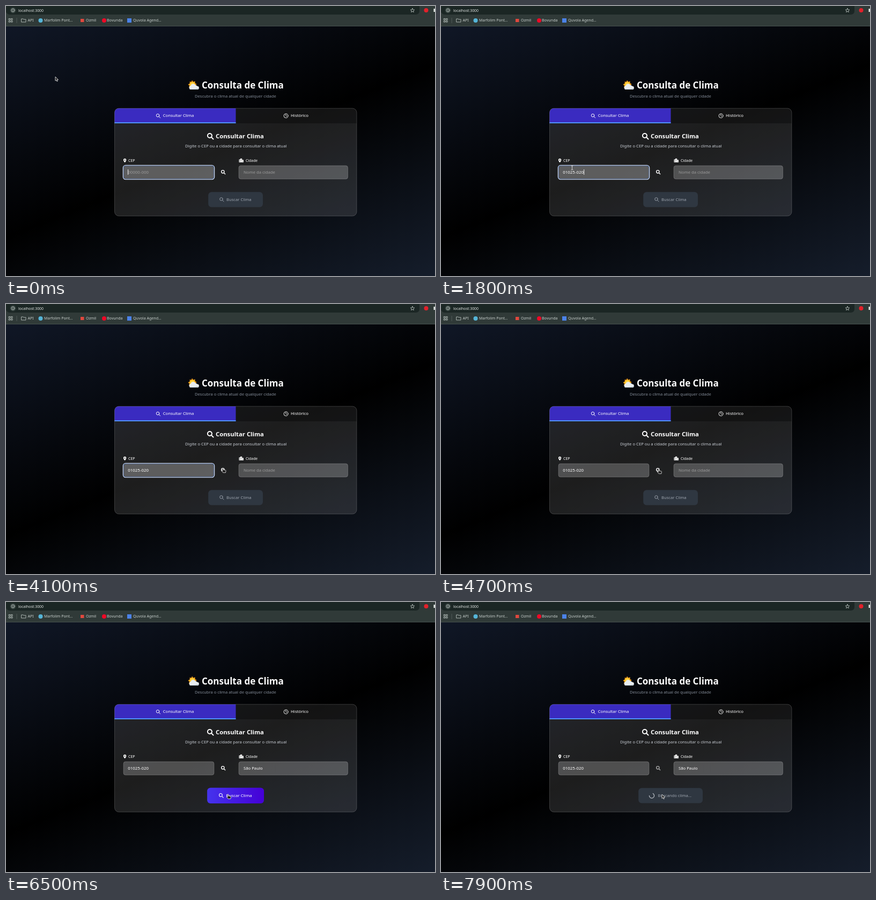
An HTML page for the animation above (8 s loop, 800 by 504 pixels).

```html
<!DOCTYPE html>
<html lang="pt-BR">
<head>
<meta charset="utf-8">
<title>Consulta de Clima</title>
<style>
  html, body { margin: 0; width: 100%; height: 100%; overflow: hidden; background: #000; }
  svg {
    display: block; width: 800px; height: 504px;
    background: linear-gradient(158deg, #101726, #000 50%, #151d2b) 0 38px / 800px 466px no-repeat;
    font: 7.7px "Noto Sans", "Open Sans", sans-serif;
  }
  .chrome { font-size: 7.1px; fill: #c6cecb; }
  .strong { font-weight: 700; fill: #fff; }
  .medium { font-weight: 500; }
  .line { fill: none; stroke: currentColor; stroke-linecap: round; stroke-linejoin: round; }
  .field { fill: #fff; fill-opacity: .22; stroke: #fff; stroke-opacity: .28; stroke-width: .7; }
  .pointer { fill: #202020; stroke: #f2f2f2; stroke-width: .8; stroke-linejoin: round; }
</style>
</head>
<body>
<svg viewBox="0 0 800 504">
  <defs>
    <symbol id="lens" viewBox="0 0 10 10" overflow="visible">
      <path class="line" d="M7.2 4.1A3.1 3.1 0 1 1 1 4.1A3.1 3.1 0 1 1 7.2 4.1M6.4 6.4L9.2 9.2"/>
    </symbol>
    <linearGradient id="indigo"><stop stop-color="#4533ed"/><stop offset="1" stop-color="#4500d6"/></linearGradient>
    <clipPath id="panelClip"><rect x="202.5" y="191" width="451.5" height="201" rx="8"/></clipPath>
  </defs>

  <!-- Browser bars -->
  <rect width="800" height="38" fill="#303a38"/>
  <path d="M0 0H771V9Q771 16 764 16H8Q2 16 0 11Z" fill="#1b2624"/>
  <path d="M0 37.5H800" stroke="#46504e"/>
  <g class="chrome">
    <circle cx="13" cy="8" r="5.5" fill="#34403d"/>
    <g class="line" color="#c6cecb" stroke-width=".8">
      <circle cx="13" cy="8" r="3.1"/><path d="M13 7.6V9.6M13 6.4V6.5"/>
      <path d="M758 4.4L759.1 6.9 761.7 7.1 759.7 8.9 760.3 11.5 758 10.1 755.7 11.5 756.3 8.9 754.3 7.1 756.9 6.9Z"/>
      <path d="M5.5 23.5h2.4v2.4h-2.4zM9.7 23.5h2.4v2.4h-2.4zM5.5 27.7h2.4v2.4h-2.4zM9.7 27.7h2.4v2.4h-2.4z"/>
      <path d="M29 24H32L33 25H37V30H29Z"/>
      <path d="M20 22.5V31.5" stroke="#5c6664"/>
    </g>
    <circle cx="783.5" cy="8" r="4" fill="#e3212b"/>
    <rect x="797.5" y="5" width="3" height="6" fill="#dde3e0"/>
    <circle cx="64.5" cy="27" r="4" fill="#55b5d8"/>
    <rect x="139" y="24" width="6.5" height="6" fill="#e0483e"/>
    <circle cx="183" cy="27" r="4" fill="#f00826"/>
    <rect x="226" y="23" width="8" height="8" fill="#4b82e8"/>
    <text x="23" y="10.6" font-size="6.95" fill="#e0e5e3">localhost:3000</text>
    <text x="40.5" y="29.4">API</text>
    <text x="71" y="29.4">Marfolim Pont…</text>
    <text x="149" y="29.4">Ozmil</text>
    <text x="188" y="29.4">Bovunda</text>
    <text x="237" y="29.4">Quvola Agend…</text>
  </g>

  <!-- Heading with sun and cloud -->
  <path d="M347 138.5L349 141.5 352.5 140.5 352.6 144 355.6 146 353 148.6 353 152H340.8L342.3 149 339.5 146.4 342.7 144.6 342.6 141.2 345.8 141.6Z" fill="#f6a51b"/>
  <circle cx="347.5" cy="146.6" r="4.5" fill="#ffd23e"/>
  <path d="M344.5 156A3.7 3.7 0 0 1 344.4 148.8A5 5 0 0 1 353.3 147.4A4.1 4.1 0 0 1 356.4 149.6A3.2 3.2 0 0 1 357 156Z" fill="#e8edf0"/>
  <path d="M342 154.5Q350 156 359 153.7Q358.4 156 356 156H344.5Q342.7 156 342 154.5Z" fill="#b7c3cb"/>
  <text class="strong" x="365" y="153.8" font-size="17">Consulta de Clima</text>
  <text x="352" y="170.6" font-size="7.6" fill="#858d99">Descubra o clima atual de qualquer cidade</text>

  <!-- Panel -->
  <g clip-path="url(#panelClip)">
    <rect x="202" y="191" width="453" height="202" fill="#fff" fill-opacity=".115"/>
    <rect x="428.5" y="191" width="226" height="28" fill="#000" fill-opacity=".35"/>
    <rect x="202" y="191" width="226.5" height="28" fill="#3a2bc0"/>
    <rect x="202" y="217" width="226.5" height="2" fill="#4f91fa"/>
  </g>
  <rect x="202.5" y="191" width="451.5" height="201" rx="8" fill="none" stroke="#fff" stroke-opacity=".23" stroke-width=".8"/>
  <g color="#fff">
    <use href="#lens" x="279.4" y="200.6" width="9" height="9" stroke-width="1.1"/>
    <use href="#lens" x="374.6" y="236.6" width="13" height="13" stroke-width="1.5"/>
    <g class="line" stroke-width=".9"><circle cx="522" cy="205" r="3.9"/><path d="M522 202.6V205.2L523.6 206.2"/></g>
  </g>
  <g class="medium" fill="#fff">
    <text x="292.7" y="207.4" font-size="7.75">Consultar Clima</text>
    <text x="531" y="207.4" font-size="7.9">Histórico</text>
    <text x="228" y="290.8" font-size="7">CEP</text>
    <text x="447" y="290.8" font-size="6.85">Cidade</text>
  </g>
  <text class="strong" x="391" y="247.2" font-size="11.3">Consultar Clima</text>
  <text x="334" y="263.9" fill="#c9ced5">Digite o CEP ou a cidade para consultar o clima atual</text>
  <path d="M221.6 292.2Q218.9 289 218.9 287.4A2.7 2.7 0 0 1 224.3 287.4Q224.3 289 221.6 292.2ZM221.6 286.4a1 1 0 1 0 .01 0Z" fill="#fff" fill-rule="evenodd"/>
  <path d="M434.5 291.8V286.5H436.8V284.8H440.2V287.3H443V291.8Z" fill="#fff"/>
  <path d="M436 288v2.4M438.5 286.5v1M438.5 288.7v1M441.3 288.7v1.6" stroke="#222" stroke-width=".8"/>

  <!-- Fields -->
  <rect class="field" x="219" y="298" width="169" height="25" rx="4"/>
  <rect class="field" x="434" y="298" width="203.5" height="25" rx="4"/>
  <g id="focus" fill="none">
    <rect x="219" y="298" width="169" height="25" rx="4" fill="#fff" fill-opacity=".08" stroke="#2a4f91"/>
    <rect x="218.3" y="297.3" width="170.4" height="26.4" rx="4.6" stroke="#e3edff" stroke-width="1.1"/>
  </g>
  <text id="zip" x="227.2" y="313" font-size="7.95"></text>
  <text id="city" x="443" y="313"></text>
  <rect id="caret" y="305" width=".9" height="10" fill="#fff"/>
  <use id="lookup" href="#lens" x="400.8" y="305.8" width="8.6" height="8.6" color="#fff" stroke-width="1.6"/>

  <!-- Submit button -->
  <g id="button" class="medium">
    <rect id="buttonOff" y="347.3" height="28.2" rx="6" fill="#2f3741"/>
    <rect id="buttonOn" x="377.2" y="347.3" width="101.8" height="28.2" rx="6" fill="url(#indigo)"/>
    <use id="buttonLens" href="#lens" x="397.8" y="356.8" width="9" height="9" stroke-width="1.1"/>
    <text id="buttonText" y="363.8" font-size="7.65"></text>
    <path id="spinner" class="line" d="M395.3 357.5A4.6 4.6 0 1 1 388.4 361.5" color="#c3c8cf" stroke-width="1.2"/>
  </g>

  <g id="cursor" class="pointer">
    <path id="arrow" d="M0 0V7.6L1.8 6.1 3 8.8 4.3 8.2 3.2 5.6H5.5Z"/>
    <path id="beam" d="M-1.8 -3.8Q0 -3.8 0 -2.8Q0 -3.8 1.8 -3.8M0 -2.8V2.8M-1.8 3.8Q0 3.8 0 2.8Q0 3.8 1.8 3.8" fill="none"/>
    <path id="hand" d="M-.8 .6Q0 -.4 .8 .6V3.4L4.8 4.2Q5.6 4.5 5.5 5.5L4.8 8.8H.2L-2.5 5.6Q-2.4 4.5 -.8 5.4Z"/>
  </g>
</svg>
<script>
const LOOP = 8000, STEP = 100;
const $ = id => document.getElementById(id);
const ramp = (t, from, to) => Math.min(1, Math.max(0, (t - from) / (to - from)));
const within = (t, from, to) => t >= from && t < to;
const show = (id, on) => $(id).setAttribute('visibility', on ? 'visible' : 'hidden');
const set = (id, attrs) => Object.entries(attrs).forEach(([k, v]) => $(id).setAttribute(k, v));

// Pointer stops: time, x, y
const path = [
  [0, 92, 132], [100, 130, 64], [200, 172, 26], [300, 223, 228], [500, 223, 228],
  [700, 187, 232], [900, 214, 280], [1100, 244.5, 302], [2200, 244.5, 302],
  [2500, 285, 312], [2800, 285, 312], [2900, 286, 314], [3200, 286, 314],
  [3600, 388, 312], [3800, 418, 314], [4100, 404.6, 306], [4200, 404.6, 306],
  [4300, 406, 308], [6000, 406, 308], [6300, 413, 347], [6500, 414, 358.5],
  [6800, 412, 359], [8000, 412, 359]
];

function pointerAt(t) {
  const i = path.findIndex(stop => stop[0] > t);
  const [a, b] = [path[i - 1], path[i]];
  const k = ramp(t, a[0], b[0]);
  return [a[1] + (b[1] - a[1]) * k, a[2] + (b[2] - a[2]) * k];
}

function pointerKind(x, y, loading) {
  const inside = (l, t, r, b) => x >= l && x <= r && y >= t && y <= b;
  if (inside(219, 298, 388, 323)) return 'beam';
  if (!loading && (inside(396, 300, 414, 320) || inside(377, 347, 479, 376))) return 'hand';
  return 'arrow';
}

function render(t) {
  const typed = t >= 1800, found = t >= 5400, loading = t >= 7100;

  $('zip').textContent = typed ? '01025-020' : '00000-000';
  set('zip', { fill: typed ? '#fff' : '#9b9b9b' });
  $('city').textContent = found ? 'São Paulo' : 'Nome da cidade';
  set('city', { fill: found ? '#fff' : '#9b9b9b' });

  set('focus', { opacity: 1 - ramp(t, 4400, 4700) });
  const caretOff = within(t, 300, 800) || within(t, 2900, 3400) || within(t, 3900, 4300) || t >= 4500;
  show('caret', !caretOff);
  set('caret', { x: typed ? 266.2 : 227.2 });
  set('lookup', { opacity: loading ? .6 : 1 });

  const active = loading ? 0 : ramp(t, 5300, 5700);
  const hover = ramp(t, 6200, 6500) - ramp(t, 7000, 7200);
  const ink = active > .5 ? '#fff' : '#9ca3ad';
  set('button', { transform: `translate(428 361.4) scale(${1 + .04 * hover}) translate(-428 -361.4)` });
  set('buttonOff', loading ? { x: 368.2, width: 119.8 } : { x: 377.2, width: 101.8 });
  set('buttonOn', { opacity: active });
  set('buttonLens', { color: ink });
  $('buttonText').textContent = loading ? 'Buscando clima...' : 'Buscar Clima';
  set('buttonText', { x: loading ? 404.5 : 411, fill: ink });
  show('buttonLens', !loading);
  show('spinner', loading);
  set('spinner', { transform: `rotate(${(t - 7900) * .36} 393 361.5)` });

  const [x, y] = pointerAt(t);
  const kind = pointerKind(x, y, loading);
  set('cursor', { transform: `translate(${x} ${y})` });
  ['arrow', 'beam', 'hand'].forEach(id => show(id, id === kind));
}

const start = performance.now();
function frame() {
  const elapsed = (performance.now() - start) % LOOP;
  render(Math.floor(elapsed / STEP) * STEP);
  requestAnimationFrame(frame);
}
frame();
</script>
</body>
</html>
```
